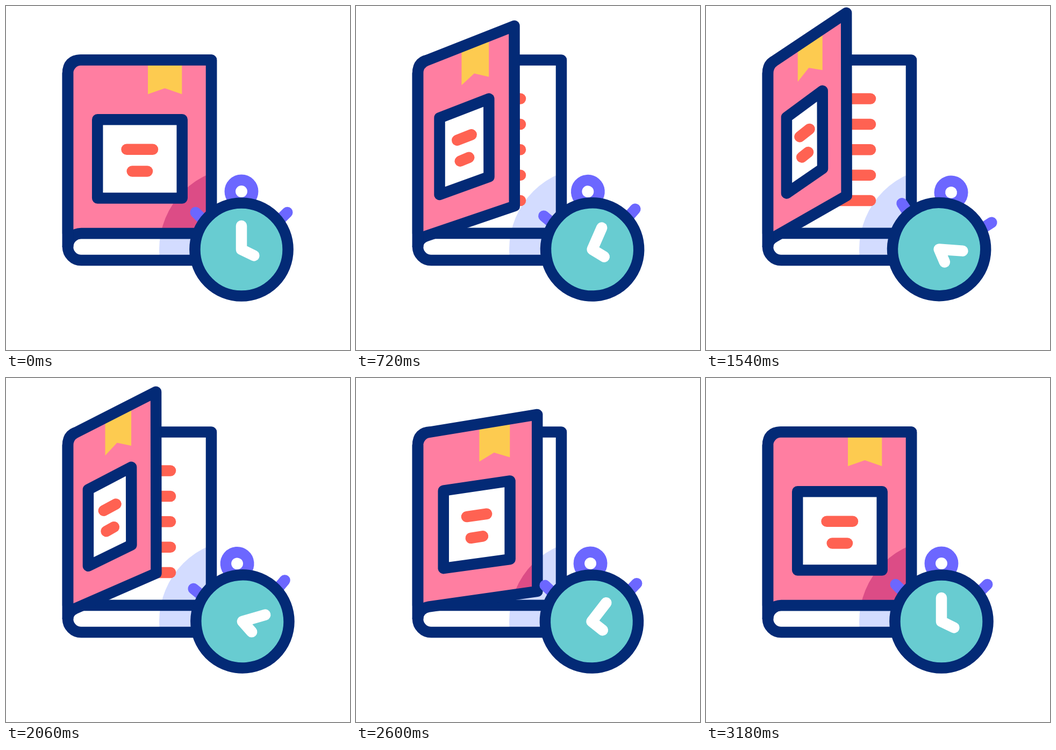
An HTML page with a canvas that plays this animation: 640x640 px, repeating every 3.6 s.

```html
<!DOCTYPE html>
<html lang="en">
<head>
<meta charset="utf-8">
<title>Book and stopwatch</title>
<style>
  html, body { margin: 0; width: 100%; height: 100%; overflow: hidden; background: #fff; }
  canvas { display: block; width: 640px; height: 640px; }
</style>
</head>
<body>
<canvas id="stage" width="640" height="640"></canvas>
<script>
const ctx = document.getElementById('stage').getContext('2d');
const LOOP = 3600, LINE = 20.5, TAU = Math.PI * 2;
const NAVY = '#032a76', PINK = '#ff7ea1', ROSE = '#dc4c86', GOLD = '#fdcb50',
      RED = '#ff6252', MIST = '#d3dcff', TEAL = '#68ccd1', VIOLET = '#6c67ff', WHITE = '#fff';

// Smooth curve through [time, value] keys, at rest at both ends.
function curve(keys) {
  const last = keys.length - 1;
  const rate = i => (keys[i + 1][1] - keys[i][1]) / (keys[i + 1][0] - keys[i][0]);
  const slope = keys.map((k, i) => {
    if (i === 0 || i === last) return 0;
    const before = k[0] - keys[i - 1][0], after = keys[i + 1][0] - k[0];
    return (rate(i - 1) * after + rate(i) * before) / (before + after);
  });
  return t => {
    if (t <= keys[0][0]) return keys[0][1];
    if (t >= keys[last][0]) return keys[last][1];
    let i = 0;
    while (t > keys[i + 1][0]) i++;
    const [t0, a] = keys[i], [t1, b] = keys[i + 1];
    const h = t1 - t0, u = (t - t0) / h, v = 1 - u;
    return a * (1 + 2 * u) * v * v + slope[i] * h * u * v * v
         + b * u * u * (3 - 2 * u) - slope[i + 1] * h * u * u * v;
  };
}

const openness = curve([
  [120, 0], [283, .0615], [400, .2075], [524, .43], [660, .65], [857, .854],
  [1060, .963], [1200, 1], [1380, 1.013], [1540, 1.003], [1740, .981],
  [2060, .855], [2280, .72], [2600, .373], [2820, .126], [2990, .028], [3180, 0]
]);
const minuteTurn = curve([
  [100, 0], [400, 11.7], [1060, 48.5], [1540, 82], [1780, 88.5],
  [2060, 79], [2600, 39], [3180, 0]
]);

// Alternating rocking of the watch, in degrees, fading out near the end.
const SWINGS = [0, -13.3, 13.3, -13.3, 13.3, -13.3, 13.3, -13.3, 13, -12, 10, -8.7, 4.6, -5, 0];
function rocking(t) {
  const pos = Math.max(0, (t - 100) / 183), i = Math.floor(pos);
  if (i >= SWINGS.length - 1) return 0;
  const ease = (1 - Math.cos((pos - i) * Math.PI)) / 2;
  return SWINGS[i] + (SWINGS[i + 1] - SWINGS[i]) * ease;
}

function stroke(path, color = NAVY) {
  ctx.strokeStyle = color;
  ctx.stroke(path);
}
function fill(path, color) {
  ctx.fillStyle = color;
  ctx.fill(path);
}
function poly(points, closed = true) {
  const path = new Path2D();
  points.forEach(([x, y]) => path.lineTo(x, y));
  if (closed) path.closePath();
  return path;
}
function disc(x, y, r) {
  const path = new Path2D();
  path.arc(x, y, r, 0, TAU);
  return path;
}
function bar(x0, y0, x1, y1, color) {
  stroke(poly([[x0, y0], [x1, y1]], false), color);
}

const shade = disc(438, 453, 153);
function shaded(path, base, tint) {
  fill(path, base);
  ctx.save();
  ctx.clip(path);
  fill(shade, tint);
  ctx.restore();
}

const pages = new Path2D('M115 423V125Q115 100.5 139 100.5H382V423Z');
const block = new Path2D('M382 423H140A25 25 0 0 0 140 473H382Z');
const spine = new Path2D('M115 125V448');

function drawPages() {
  shaded(pages, WHITE, MIST);
  for (let i = 0; i < 5; i++) bar(215, 172.5 + i * 47.4, 306, 172.5 + i * 47.4, RED);
  stroke(pages);
  shaded(block, WHITE, MIST);
  stroke(block);
}

function drawCover(p) {
  // Each point runs straight from its closed place to its open place.
  const at = (x0, y0, x1, y1) => [x0 + (x1 - x0) * p, y0 + (y1 - y0) * p];
  const cover = new Path2D();
  cover.moveTo(115, 448);
  cover.lineTo(...at(115, 125, 115, 126));
  cover.bezierCurveTo(...at(115, 111.5, 115, 116), ...at(126, 100.5, 119, 107.5),
                      ...at(139, 100.5, 127, 102.3));
  cover.lineTo(...at(382, 100.5, 261.5, 13));
  cover.lineTo(...at(382, 423, 262, 353));
  cover.lineTo(...at(140, 423, 127, 429.8));
  cover.bezierCurveTo(...at(126.2, 423, 119, 434.5), ...at(115, 434.2, 115, 441), 115, 448);
  cover.closePath();

  shaded(cover, PINK, ROSE);
  fill(poly([
    at(264, 100.5, 171, 73), at(264, 164, 171, 141), at(295.5, 153, 191.5, 115),
    at(327.3, 164, 217, 119.5), at(327.3, 100.5, 217, 42.5)
  ]), GOLD);
  stroke(cover);
  stroke(spine);

  const label = poly([
    at(170.2, 211.3, 150, 207), at(327.7, 211.3, 217, 158),
    at(327.7, 357.5, 217.3, 302.5), at(170.2, 357.5, 150, 348.5)
  ]);
  fill(label, WHITE);
  stroke(label);
  bar(...at(224.5, 266.8, 174.5, 243.3), ...at(273, 266.8, 192.8, 229), RED);
  bar(...at(234.7, 307.5, 178.3, 281.5), ...at(263, 307.5, 190.3, 272), RED);
}

function drawHand(length, degrees) {
  const a = degrees * Math.PI / 180;
  return [438 + length * Math.sin(a), 453 - length * Math.cos(a)];
}

function drawWatch(t) {
  const turn = minuteTurn(t);
  ctx.save();
  ctx.translate(438, 432);
  ctx.rotate(rocking(t) * Math.PI / 180);
  ctx.translate(-438, -432);
  stroke(disc(438, 345, 21.2), VIOLET);
  bar(352.7, 384, 371, 402, VIOLET);
  bar(523.3, 384, 505, 402, VIOLET);
  const body = disc(438, 453, 86.6);
  fill(body, TEAL);
  stroke(body);
  stroke(poly([drawHand(44, turn), [438, 453], drawHand(26, 116 + turn * .35)], false), WHITE);
  ctx.restore();
}

function draw() {
  const t = performance.now() % LOOP;
  ctx.fillStyle = WHITE;
  ctx.fillRect(0, 0, 640, 640);
  ctx.lineWidth = LINE;
  ctx.lineCap = ctx.lineJoin = 'round';
  drawPages();
  drawCover(openness(t));
  drawWatch(t);
  requestAnimationFrame(draw);
}
draw();
</script>
</body>
</html>
```
